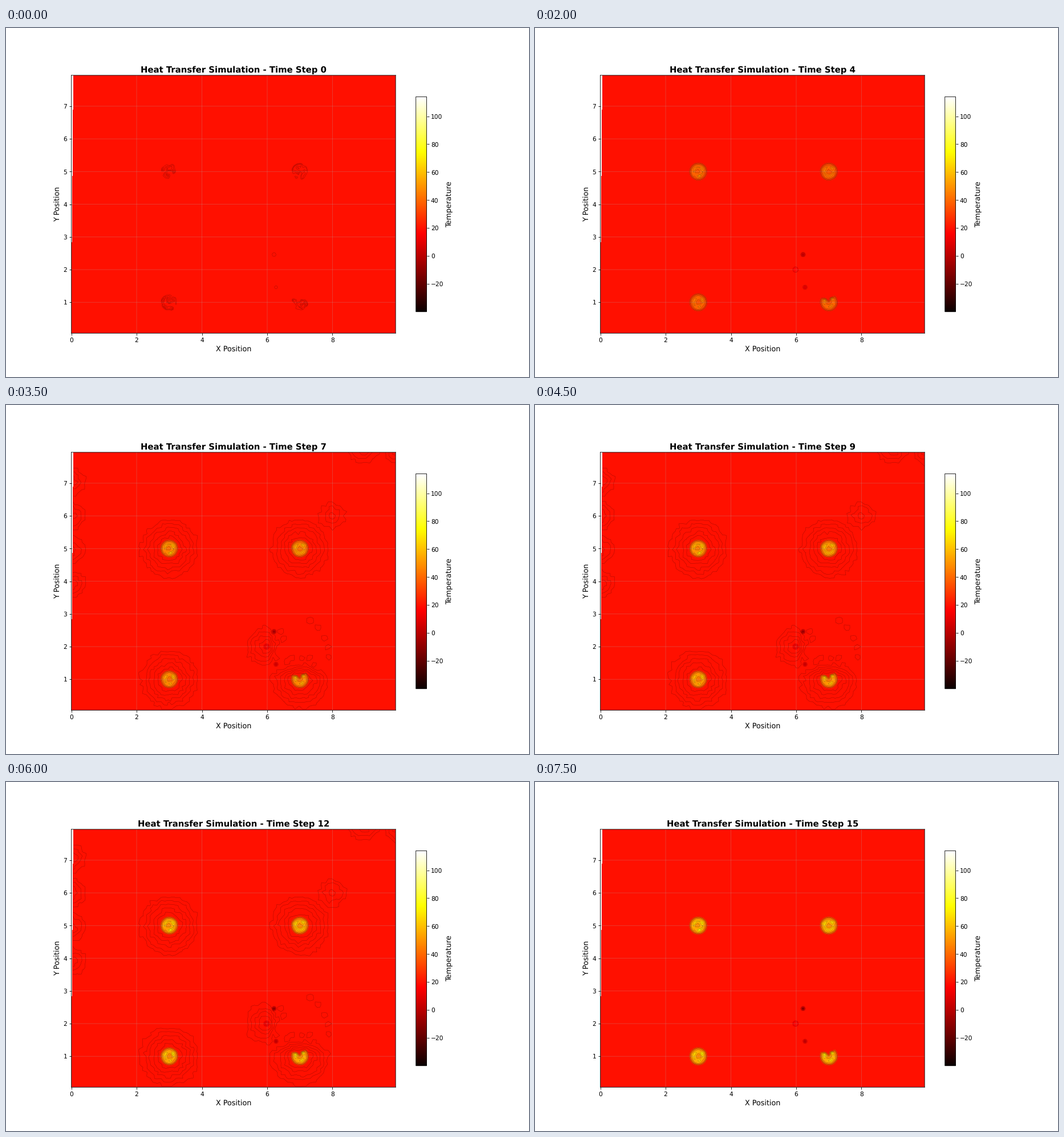
Write a matplotlib script that moves like this. It is 917 px wide and 611 px high and loops after 8000 ms.

```python
from itertools import product

import numpy as np
import matplotlib.pyplot as plt
from matplotlib.animation import FuncAnimation
from matplotlib.cm import ScalarMappable
from matplotlib.colors import Normalize
from matplotlib.tri import Triangulation

plt.rcParams["path.snap"] = False
plt.rcParams["text.hinting"] = "none"

STEPS, STEP_MS = 16, 500
X_MAX, Y_MIN, Y_MAX = 9.935, 0.055, 7.945
T_MIN, T_MAX, AMBIENT = -40, 114, 20
FILL_LEVELS = np.linspace(T_MIN, T_MAX, 100)
HEATER_R, RING_GAP = 0.285, 0.13

HEATERS = list(product((3, 7), (1, 5)))
# x, y, radius, strength
COOLERS = [(6.21, 2.46, 0.08, 1.0), (6.27, 1.46, 0.08, 0.6), (5.98, 2.0, 0.14, 0.18)]
SPOT_ANGLES = np.radians(35 + 125 * np.arange(3))


def polar(cx, cy, r, angle):
    return np.column_stack([cx + r * np.cos(angle), cy + r * np.sin(angle)])


def disc(cx, cy, radius, count):
    """Concentric vertices around a centre."""
    rows = [np.array([[cx, cy]])]
    for k in range(1, count + 1):
        n = 2 + 4 * k
        rows.append(polar(cx, cy, radius * k / count, 2 * np.pi * np.arange(n) / n + k + cx))
    return np.vstack(rows)


def build_mesh():
    gx, gy = np.meshgrid(np.linspace(0, X_MAX, 88), np.linspace(Y_MIN, Y_MAX, 70))
    for g in (gx, gy):
        g[1:-1, 1:-1] += rng.uniform(-0.03, 0.03, g[1:-1, 1:-1].shape)
    gx[:, 0] = 0.068 * (gy[:, 0] - Y_MIN) / (Y_MAX - Y_MIN)
    pts = np.column_stack([gx.ravel(), gy.ravel()])
    discs = [(x, y, HEATER_R, 4) for x, y in HEATERS]
    discs += [(x, y, r, 2) for x, y, r, _ in COOLERS]
    for cx, cy, radius, _ in discs:
        pts = pts[np.hypot(pts[:, 0] - cx, pts[:, 1] - cy) > radius + 0.04]
    return np.vstack([pts] + [disc(*d) for d in discs]).T


def heat_shape():
    """Relative heating: a bright rim with hot spots and a cooler middle."""
    heat = np.zeros_like(px)
    for cx, cy in HEATERS:
        dx, dy = px - cx, py - cy
        r, theta = np.hypot(dx, dy), np.degrees(np.arctan2(dy, dx))
        part = np.interp(r, [0, 0.07, 0.15, 0.215, HEATER_R], [0.52, 0.6, 0.82, 0.6, 0])
        for x, y in polar(0, 0, 0.15, SPOT_ANGLES):
            part += 0.25 * np.exp(-((dx - x) ** 2 + (dy - y) ** 2) / 0.05 ** 2) * (r < 0.25)
        if (cx, cy) == (7, 1):
            part[(theta > 55) & (theta < 150) & (r > 0.03)] = 0
        heat += part
    return heat * rng.uniform(0.85, 1.1, heat.size)


def cold_shape():
    return sum(strength * np.interp(np.hypot(px - x, py - y), [0, size / 2, size], [1, 0.7, 0])
               for x, y, size, strength in COOLERS)


def ring_sources():
    rings = [(x, y, 0.84) for x, y in HEATERS]
    rings += [(0, 3.9 + 1.05 * k, 0.38) for k in range(4)]
    rings += [(5.98, 2, 0.57), (8, 6, 0.36), (8.95, 8.13, 0.47), (9.98, 7.95, 0.35)]
    return rings


def loop_centres():
    """Single-cell loops: an arc on the right and a few strays by the coolers."""
    arc = polar(6.2, 1.6, 1.64, np.radians(np.linspace(46, 1, 5)))
    strays = rng.uniform((6.2, 1.6), (6.5, 2.5), (4, 2))
    crown = polar(7, 1, 0.66, np.radians(np.linspace(45, 130, 5)))
    return np.vstack([arc, strays, crown])


def ring_field(step):
    """Whole ring number at each vertex, 0 outside."""
    q = np.zeros_like(px)
    for cx, cy, size in ring_sources():
        dx, dy = px - cx, py - cy
        depth = size + 0.004 * (step - 7) - np.hypot(dx, dy)
        if (cx, cy) == (7, 1):
            depth -= 1.3 * np.clip(dy - 0.1, 0, None)
        elif (cx, cy) == (5.98, 2):
            depth -= 2 * np.clip(dx - 0.1, 0, None)
        q = np.maximum(q, np.clip(np.ceil(depth / RING_GAP), 0, 5))
    for x, y in loops:
        i = np.argmin((px - x) ** 2 + (py - y) ** 2)
        q[i] = max(q[i], 1)
    return q


rng = np.random.default_rng(7)
px, py = build_mesh()
mesh = Triangulation(px, py)
heat, cold = heat_shape(), cold_shape()
loops = loop_centres()
grain = np.where(heat > 0.02, rng.random(heat.size), 0)

fig, ax = plt.subplots(figsize=(12.0066, 8), dpi=76.375)
ax.set_aspect("equal")
ax.set_xlim(0, X_MAX)
ax.set_ylim(Y_MIN, Y_MAX)
ax.set_xticks(range(0, 9, 2))
ax.set_yticks(range(1, 8))
ax.set_xlabel("X Position", fontsize=12)
ax.set_ylabel("Y Position", fontsize=12, labelpad=3)
ax.grid(True, alpha=0.3)
title = ax.set_title("", fontsize=14, fontweight="bold", pad=5)

scale = ScalarMappable(Normalize(T_MIN, T_MAX), cmap="hot")
bar = fig.colorbar(scale, ax=ax, shrink=0.8, ticks=range(-20, 101, 20))
bar.set_label("Temperature", fontsize=12)

drawn = []


def add_lines(values, levels):
    drawn.append(ax.tricontour(mesh, values, levels=levels, colors="black",
                               alpha=0.33, linewidths=0.5))


def update(step):
    while drawn:
        drawn.pop().remove()
    rise = 1 - np.exp(-step / 6)
    hot_amp, cold_amp = 0.5 + 52 * rise, 0.3 + 40 * rise
    temp = AMBIENT + hot_amp * heat - cold_amp * cold
    drawn.append(ax.tricontourf(mesh, temp, levels=FILL_LEVELS, cmap="hot",
                                vmin=T_MIN, vmax=T_MAX, extend="both"))
    if step == 0:
        add_lines(grain, [0.4, 0.6, 0.8])
        add_lines(cold, [0.35])
    else:
        add_lines(heat, np.linspace(0.12, 0.96, 6))
        add_lines(cold, [0.1, 0.4, 0.75])
    if 7 <= step <= 14:
        add_lines(ring_field(step), np.arange(5) + 0.25)
    title.set_text(f"Heat Transfer Simulation - Time Step {step}")
    return drawn


anim = FuncAnimation(fig, update, frames=STEPS, interval=STEP_MS,
                     repeat=True, repeat_delay=0, blit=False)
plt.show()
```
